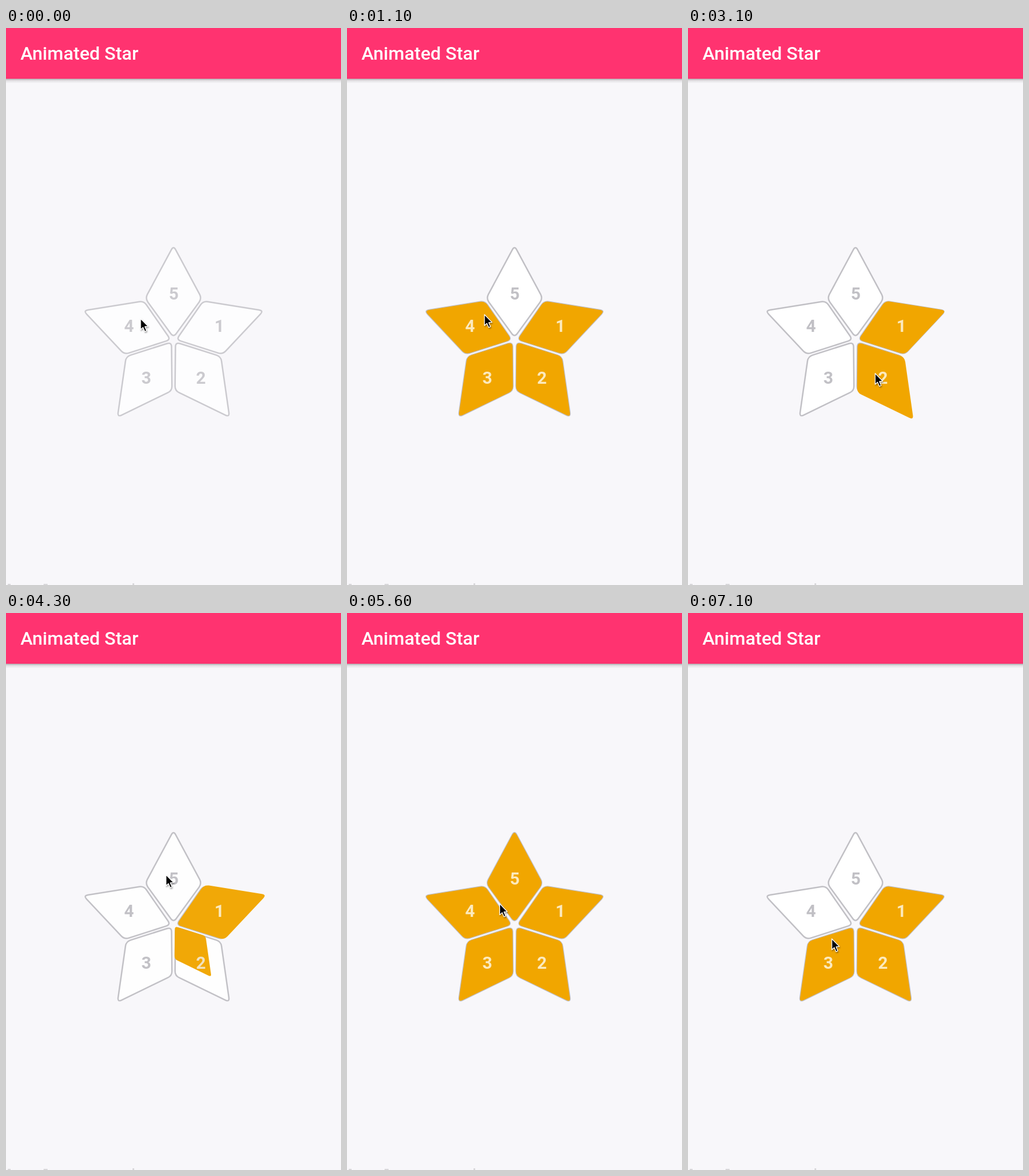
Animation, 580 px wide and 966 px high, one loop 7200 ms. Source, as an HTML page:

```html
<!DOCTYPE html>
<html lang="en">
<head>
<meta charset="utf-8">
<title>Animated Star</title>
<style>
  html, body { margin: 0; width: 100%; height: 100%; overflow: hidden; background: #f8f7fa; }
  svg { display: block; width: 580px; height: 966px; font-family: Roboto, sans-serif; }
  .title { font-size: 32px; font-weight: 500; fill: #fff; }
  .digit { font-size: 29.5px; font-weight: 700; text-anchor: middle; }
  #cursor { filter: drop-shadow(1px 2px 1.2px rgba(0, 0, 0, .35)); }
</style>
</head>
<body>
<svg viewBox="0 0 580 966">
  <defs>
    <linearGradient id="shade" x1="0" y1="0" x2="0" y2="1">
      <stop offset="0" stop-color="#000" stop-opacity=".3"/>
      <stop offset=".4" stop-color="#000" stop-opacity=".09"/>
      <stop offset="1" stop-color="#000" stop-opacity="0"/>
    </linearGradient>
  </defs>
  <rect width="580" height="966" fill="#f8f7fa"/>
  <rect y="88" width="580" height="8" fill="url(#shade)"/>
  <rect width="580" height="88" fill="#ff3370"/>
  <text class="title" x="25" y="55">Animated Star</text>
  <g fill="#d9d8db">
    <rect x="3" y="964" width="5" height="2"/>
    <rect x="65" y="964" width="7" height="2"/>
    <rect x="219" y="963" width="3" height="3"/>
  </g>
  <g id="star"></g>
  <path id="cursor" d="M0 0V19L4.2 15.2L7.4 22.4L10.4 21L7.4 14L13 13.4Z"
        fill="#000" stroke="#fff" stroke-width="1.3" stroke-linejoin="round"/>
</svg>
<script>
const LOOP = 7200, STEP = 100;
const CX = 290, CY = 540;
const NS = 'http://www.w3.org/2000/svg';
const star = document.getElementById('star');
const cursor = document.getElementById('cursor');

const mirror = pts => pts.map(([x, y]) => [2 * CX - x, y]);
const side = [[341.5, 473.5], [446, 490.3], [375, 566], [295, 540.5]];
const foot = [[293.5, 544.8], [372, 569.8], [387, 674.8], [292.6, 629]];
const top5 = [[290, 377.5], [339, 469], [290, 536.5], [241, 469]];

const petals = [
  { pts: side, at: [369.5, 516] },
  { pts: foot, at: [337.5, 606] },
  { pts: mirror(foot), at: [243, 606] },
  { pts: mirror(side), at: [213, 516] },
  { pts: top5, at: [290.5, 460] }
];

// press time, first petal start, delay between petals, rating
const taps = [
  { press: 0, start: 50, gap: 150, rating: 4 },
  { press: 2610, start: 2640, gap: 150, rating: 2 },
  { press: 3990, start: 4025, gap: 150, rating: 5 },
  { press: 6080, start: 6086, gap: 55, rating: 3 }
];

// time, x, y of the pointer tip
const route = [
  [0, 233, 504], [600, 238, 497], [1700, 238, 497], [2450, 324, 601],
  [2700, 324, 599], [3250, 324, 599], [3900, 277, 454], [5250, 277, 454],
  [6000, 249, 566], [6400, 249, 565], [LOOP, 249, 565]
];

const clamp = v => Math.max(0, Math.min(1, v));

function make(tag, attrs) {
  const el = document.createElementNS(NS, tag);
  for (const key in attrs) el.setAttribute(key, attrs[key]);
  return star.appendChild(el);
}

// polygon with softened corners
function rounded(pts, cut = 8) {
  const toward = (a, b) => {
    const k = cut / Math.hypot(b[0] - a[0], b[1] - a[1]);
    return [a[0] + (b[0] - a[0]) * k, a[1] + (b[1] - a[1]) * k];
  };
  const n = pts.length;
  return pts.map((p, i) => {
    const a = toward(p, pts[(i + n - 1) % n]);
    const b = toward(p, pts[(i + 1) % n]);
    return `${i ? 'L' : 'M'}${a} Q${p} ${b}`;
  }).join('') + 'Z';
}

petals.forEach((p, i) => {
  const d = rounded(p.pts);
  make('path', { d, fill: '#fff', stroke: '#c1c0c5', 'stroke-width': 2.5 });
  p.gold = make('path', { d, fill: '#f1a600' });
  p.text = make('text', { class: 'digit', x: p.at[0], y: p.at[1] + 10.5 });
  p.text.textContent = i + 1;
});

// damped spring from 0 to 1, t in seconds
function spring(t) {
  if (t <= 0) return 0;
  const decay = 11, freq = 10.45;
  return 1 - Math.exp(-decay * t) *
    (Math.cos(freq * t) + decay / freq * Math.sin(freq * t));
}

function mix(a, b, k) {
  return `rgb(${a.map((v, i) => Math.round(v + (b[i] - v) * k))})`;
}

function pointer(t) {
  const i = Math.max(1, route.findIndex(r => r[0] > t));
  const [t0, x0, y0] = route[i - 1], [t1, x1, y1] = route[i];
  const k = clamp((t - t0) / (t1 - t0));
  const e = k * k * (3 - 2 * k);
  return [x0 + (x1 - x0) * e, y0 + (y1 - y0) * e];
}

function draw(t) {
  const tap = taps.filter(p => p.press <= t).pop();
  const release = clamp((t - tap.press - 100) / 250);
  star.setAttribute('opacity', 0.8 + 0.2 * release);

  petals.forEach((p, i) => {
    const s = i < tap.rating ? spring((t - tap.start - i * tap.gap) / 1000) : 0;
    p.gold.setAttribute('visibility', s > 0 ? 'visible' : 'hidden');
    p.gold.setAttribute('transform',
      `translate(${CX} ${CY}) scale(${s}) translate(${-CX} ${-CY})`);
    p.text.setAttribute('fill', mix([193, 192, 197], [252, 234, 190], clamp(s * 1.2)));
  });

  cursor.setAttribute('transform', `translate(${pointer(t)})`);
}

// the picture advances ten times a second
function tick() {
  const t = (performance.now() + 4) % LOOP;
  draw(Math.floor(t / STEP) * STEP);
  requestAnimationFrame(tick);
}
tick();
</script>
</body>
</html>
```
